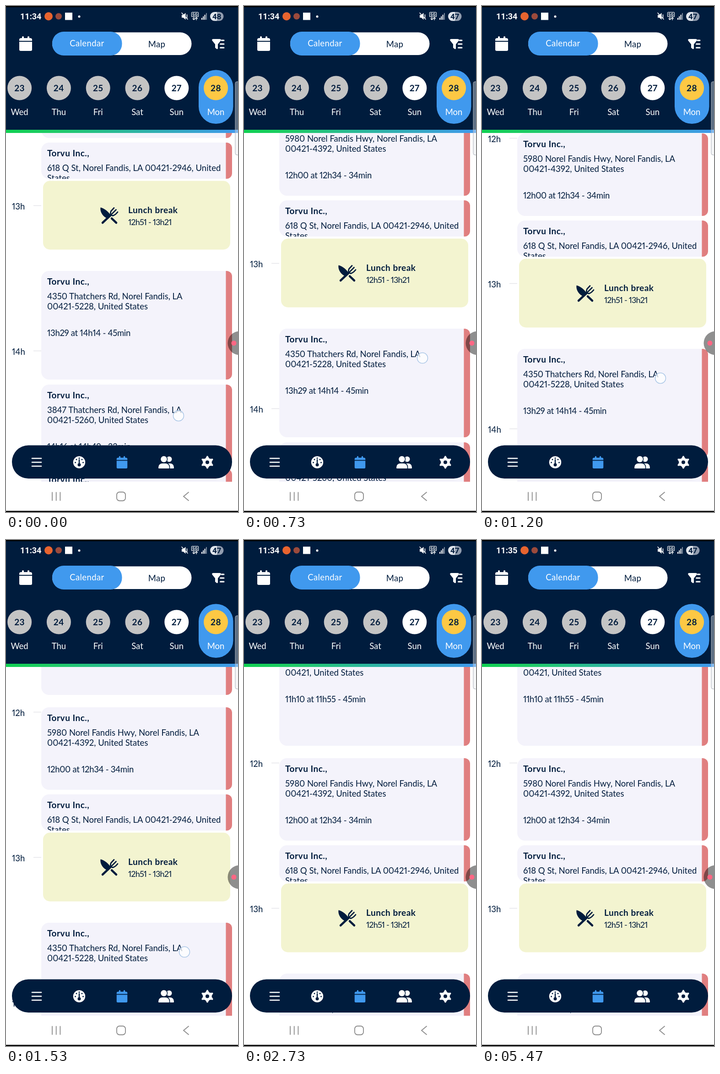
Animation, 507 px wide and 1104 px high, one loop 8.07 s. Source, as an HTML page:

```html
<!DOCTYPE html>
<html lang="en">
<head>
<meta charset="utf-8">
<title>Day planner</title>
<style>
html, body { margin: 0; width: 100%; height: 100%; overflow: hidden; background: #fff; }
#stage { display: block; width: 100vw; height: 100vh; }
text { font: 18.5px Lato, sans-serif; fill: #001c3d; font-variant-numeric: proportional-nums; }
.bold { font-weight: 700; font-size: 19px; letter-spacing: .5px; }
.time { letter-spacing: -.3px; }
.slot { font-size: 18px; letter-spacing: -.8px; }
.mid { text-anchor: middle; }
.light { fill: #fff; }
.status { font: 700 18px Roboto, sans-serif; }
.line { fill: none; stroke: #fff; stroke-linecap: round; stroke-linejoin: round; }
</style>
</head>
<body>
<svg id="stage" viewBox="0 0 507 1104">
  <defs>
    <linearGradient id="rainbow"><stop stop-color="#10d052"/><stop offset=".2" stop-color="#1fcb66"/><stop offset="1" stop-color="#4099ee"/></linearGradient>
    <linearGradient id="charge"><stop offset=".5" stop-color="#e1e6ed"/><stop offset=".5" stop-color="#929daf"/></linearGradient>
    <clipPath id="view"><path d="M0 277H507V1038H0z"/></clipPath>
    <g id="cal">
      <path d="M-14-6v-2.500q0-3.500 4-3.500h2v-2q0-2 2-2t2 2v2H4v-2q0-2 2-2t2 2v2h2q4 0 4 3.500V-6z"/>
      <path d="M-14-4H14V13q0 3-3 3H-11q-3 0-3-3z"/>
    </g>
  </defs>

  <rect width="507" height="1104" fill="#fff"/>
  <g clip-path="url(#view)"><g id="list"></g></g>

  <!-- header -->
  <path d="M0 0H507V270H0z" fill="#001c3d"/>
  <path d="M0 0H507V2.500H0zM0 1101.500H507V1104H0z"/>
  <path d="M0 270H507V277H0z" fill="url(#rainbow)"/>
  <use href="#cal" x="43" y="82" fill="#fff"/>
  <rect x="101" y="57.500" width="304.500" height="49.500" rx="24.700" fill="#fff"/>
  <rect x="101" y="56" width="152.500" height="52" rx="25" fill="#4099ee"/>
  <text class="mid light" x="177" y="88" letter-spacing=".4">Calendar</text>
  <text class="mid" x="329.500" y="89.500" letter-spacing=".4">Map</text>
  <path d="M452 72H468q3 1 1 4L463 83.500V92q0 3-3 1.500L457 91V83.500L451 76q-2-3 1-4z" fill="#fff"/>
  <path class="line" d="M471 75h5M468.500 83h7.500M468.500 91h7.500" stroke-width="3"/>
  <g id="days"></g>
  <rect x="501" y="165" width="12" height="160" rx="4" fill="#e8eaee" fill-opacity=".4" stroke="#a9aeb8"/>

  <!-- status bar -->
  <text id="clock" class="status light" x="31" y="29"></text>
  <circle cx="93" cy="22.500" r="9" fill="#e8642f"/>
  <circle cx="115" cy="22.500" r="7" fill="#9b4a3c"/>
  <rect x="129" y="14.500" width="16" height="16" fill="#fff"/>
  <circle cx="160" cy="23" r="2.500" fill="#fff"/>
  <path d="M384 19.500h3.500l5-4.500v15l-5-4.500H384z" fill="#fff"/>
  <path class="line" d="M384 15l13 14M395.500 19v7" stroke-width="1.600"/>
  <rect class="line" x="405.500" y="13.500" width="15" height="10" rx="2" stroke-width="1.200"/>
  <text class="status mid light" x="413" y="22" style="font-size:9px">5G</text>
  <path class="line" d="M410.500 24.500v5.500l-2.500-2.500m2.500 2.500l2.500-2.500" stroke-width="1.400"/>
  <path id="uplink" class="line" d="M416 30.500V25l-2 2.500m2-2.500l2.500 2.500" stroke-width="1.400"/>
  <path d="M427 26h2v4h-2zM430.300 22.500h2V30h-2zM433.600 19h2V30h-2z" fill="#fff"/>
  <path d="M436.900 15.500h2V30h-2z" fill="#8793a5"/>
  <rect x="446" y="13" width="29.500" height="19.500" rx="9.700" fill="url(#charge)"/>
  <text id="battery" class="status mid" x="460.700" y="29" style="font-size:17px"></text>

  <!-- recorder handle -->
  <circle cx="510.500" cy="735.500" r="26" fill-opacity=".44"/>
  <circle cx="498" cy="735.500" r="5.500" fill="#ff6784"/>

  <!-- app bar -->
  <rect x="13" y="958.500" width="481" height="72.500" rx="36" fill="#001c3d"/>
  <path class="line" d="M57 987h20M57 995.500h20M57 1004h20" stroke-width="2.700"/>
  <circle cx="160" cy="995.500" r="13.200" fill="#fff"/>
  <path class="line" d="M160 990v9" stroke-width="2.500" style="stroke:#001c3d"/>
  <path class="line" d="M151.500 996h0M154 989.500h0M160 986.500h0M166 989.500h0M168.500 996h0" stroke-width="3" style="stroke:#001c3d"/>
  <circle cx="160" cy="1001" r="3.500" fill="#001c3d"/>
  <use href="#cal" transform="translate(253.500 995.500) scale(.84)" fill="#4099ee"/>
  <g fill="#fff">
    <circle cx="356.500" cy="988.800" r="6"/>
    <path d="M349 998h9q9 0 9 9.500 0 1.500-1.500 1.500H349z"/>
    <g stroke="#001c3d" stroke-width="3" paint-order="stroke">
      <circle cx="345" cy="988.800" r="6.800"/>
      <path d="M333 1007.500q0-9.500 9.500-9.500h5q9.500 0 9.500 9.500 0 1.500-1.500 1.500H334.500q-1.500 0-1.500-1.500z"/>
    </g>
  </g>
  <path class="line" d="M440 984.500v22M430.500 990l19 11M449.500 990l-19 11" stroke-width="6.500" style="stroke-linecap:butt"/>
  <circle cx="440" cy="995.500" r="9.800" fill="#fff"/>
  <path class="line" d="M440 984.500v-1M440 1006.500v1M430.500 990l-1-.5M449.500 1001l1 .5M449.500 990l1-.5M430.500 1001l-1 .5" stroke-width="4"/>
  <circle cx="440" cy="995.500" r="4" fill="#001c3d"/>

  <!-- system navigation -->
  <g fill="none" stroke="#8b8b8b" stroke-width="1.800">
    <path d="M101 1060.500v19M109.700 1060.500v19M118.400 1060.500v19M399.500 1060.500l-11.500 9.500 11.500 9.500"/>
    <rect x="242" y="1060.500" width="19" height="19" rx="6"/>
  </g>
  <circle id="touch" r="11.500" fill="#fff" fill-opacity=".75" stroke="#a9c6e6" stroke-width="1.500"/>
</svg>
<script>
const $ = id => document.getElementById(id);
const text = (x, y, s, cls = '') => `<text class="${cls}" x="${x}" y="${y}">${s}</text>`;

// One appointment; the nested svg cuts off text that overflows a short card.
const card = (y, h, street, rest, time) => `<svg x="77" y="${y}" width="417" height="${h}">
  <rect width="417" height="${h}" rx="17" fill="#f4f3fb"/>
  <path d="M403.500 0h1.500a12 12 0 0 1 12 12v${h - 24}a12 12 0 0 1-12 12h-1.500z" fill="#e07f80"/>
  ${text(13, 29.5, 'Torvu Inc.,', 'bold')}${text(13, 61.5, street)}${text(13, 84, rest)}${text(13, 142, time, 'time')}</svg>`;

const hour = (n, y) => text(13, y + 6.5, n + 'h') +
  `<path d="M60 ${y - 1.5}h17" stroke="#e4e4e8" stroke-width="1.5"/>`;

const lunch = `<rect x="81" y="381.500" width="409" height="150" rx="15" fill="#f3f4d0"/>
  <path d="M206.500 439.500C215 441 225 450 230 458L223 464.500C212 460 205 450 206.500 439.500z" fill="#001c3d"/>
  <g fill="none" stroke="#001c3d" stroke-linecap="round" stroke-linejoin="round">
    <path d="M231 463.500l10 9.500M211 473l18-17" stroke-width="4.500"/>
    <path d="M236 440.500l-6.500 7Q226 455 233 457.500 238 457 244 449.500M240.500 444.500l-9 9" stroke-width="2.800"/>
  </g>` + text(267, 452, 'Lunch break', 'bold') + text(267, 477.5, '12h51 - 13h21', 'slot');

$('list').innerHTML = hour(12, 120) + hour(13, 437) + hour(14, 754) +
  card(-156, 237, '934 Thatchers Rd, Norel Fandis, LA', '00421, United States', '11h10 at 11h55 - 45min') +
  card(108, 180, '5980 Norel Fandis Hwy, Norel Fandis, LA', '00421-4392, United States', '12h00 at 12h34 - 34min') +
  card(298, 79, '618 Q St, Norel Fandis, LA 00421-2946, United', 'States', '') + lunch +
  card(578, 237, '4350 Thatchers Rd, Norel Fandis, LA', '00421-5228, United States', '13h29 at 14h14 - 45min') +
  card(826, 174, '3847 Thatchers Rd, Norel Fandis, LA', '00421-5260, United States', '14h16 at 14h49 - 33min') +
  card(1010, 180, '', '', '');

$('days').innerHTML = '<rect x="421" y="139.500" width="75.500" height="117.500" rx="37.700" fill="#4099ee"/>' +
  ['Wed', 'Thu', 'Fri', 'Sat', 'Sun', 'Mon'].map((day, i) => {
    const x = 29.6 + i * 85.8, fill = ['#c4c4c4', '#fff', '#fdc844'][Math.max(0, i - 3)];
    return `<circle cx="${x}" cy="179" r="26.500" fill="${fill}"/>` +
      text(x, 185.5, 23 + i, 'bold mid') + text(x, 237.5, day, 'mid light');
  }).join('');

// Scroll path: end of one fling, a slow drag, then a second fling that settles.
const keys = [[0, 0], [130, 45], [330, 98], [600, 124], [730, 126], [930, 135],
  [1200, 170], [1530, 256], [1730, 306], [2000, 349], [2330, 368]];
const slope = i => {
  const a = keys[Math.max(i - 1, 0)], b = keys[i + 1];
  return b ? (b[1] - a[1]) / (b[0] - a[0]) : 0;
};
function scrollAt(t) {
  const i = keys.findIndex(k => k[0] > t) - 1;
  if (i < 0) return 368;
  const [t0, y0] = keys[i], [t1, y1] = keys[i + 1], d = t1 - t0, u = (t - t0) / d, v = 1 - u;
  return v * v * (1 + 2 * u) * y0 + u * u * (3 - 2 * u) * y1 +
    d * u * v * (v * slope(i) - u * slope(i + 1));
}

const start = performance.now();
function draw() {
  const now = (performance.now() - start) % 8070;
  const t = Math.floor((now + 4) * .015) / .015;
  const y = scrollAt(t), first = t < 130;
  $('list').setAttribute('transform', `translate(0 ${Math.round(y)})`);
  $('touch').setAttribute('cx', first ? 377 : 390);
  $('touch').setAttribute('cy', (first ? 894 : 642) + y);
  $('touch').style.display = first || t > 660 && t < 1650 ? '' : 'none';
  $('clock').textContent = t < 4199 ? '11:34' : '11:35';
  $('battery').textContent = t < 330 ? 48 : 47;
  $('uplink').style.opacity = t > 4460 && t < 5460 ? .4 : 1;
  requestAnimationFrame(draw);
}
draw();
</script>
</body>
</html>
```
